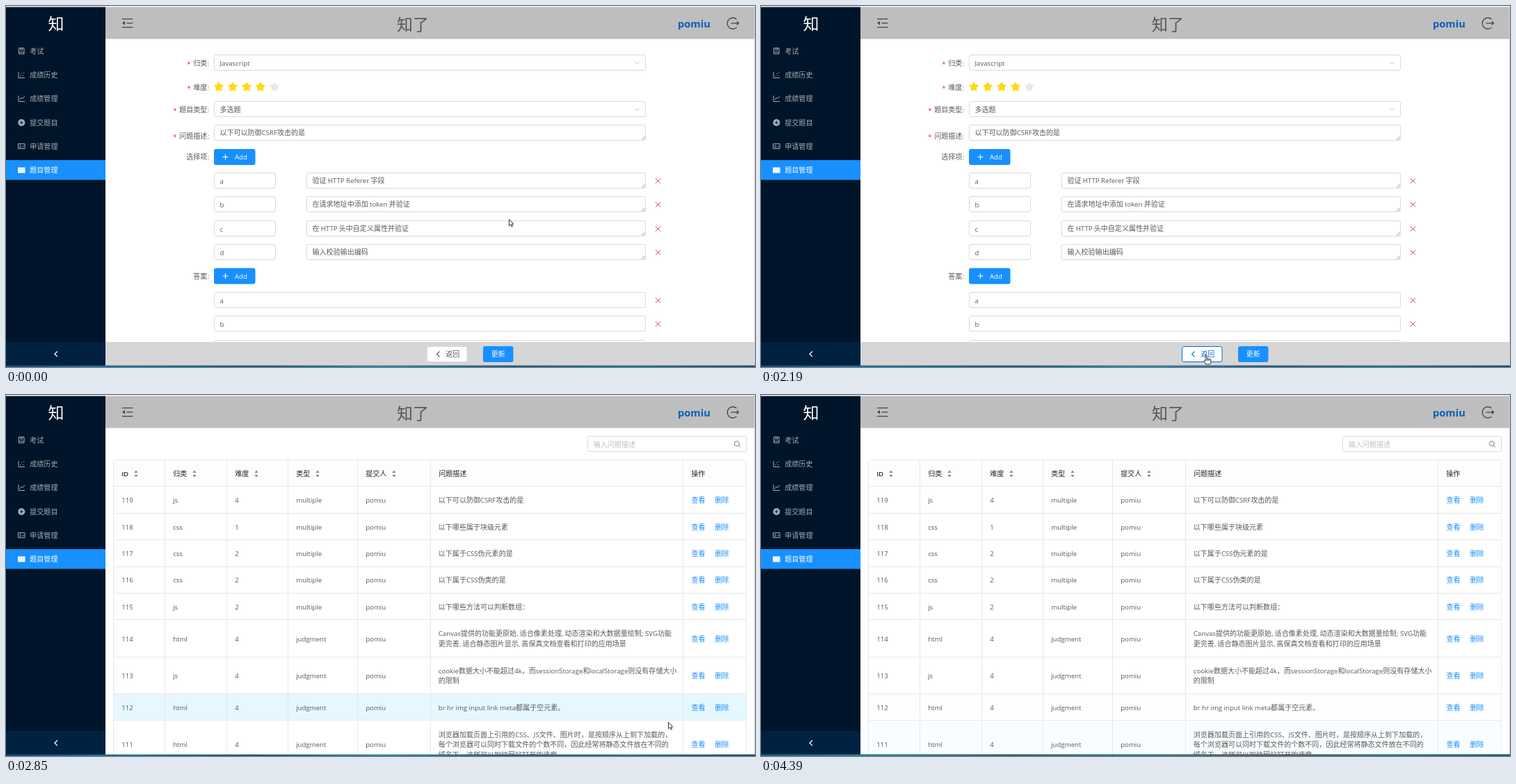
Write an HTML page that moves like this. It is 1077 by 520 pixels and loops after 4490 ms.

```html
<!DOCTYPE html>
<html lang="zh-CN">
<head>
<meta charset="utf-8">
<title>题目管理</title>
<style>
html, body { margin: 0; width: 100%; height: 100%; overflow: hidden; background: #fff; }
svg { display: block; width: 100vw; height: 100vh; }
text { font: 10.04px "Noto Sans CJK SC", "Noto Sans CJK", sans-serif; fill: #595959; }
.l { font-family: "Open Sans", "Noto Sans", sans-serif; font-size: .96em; }
.menu { fill: #a6adb4; }
.white { fill: #fff; }
.head { fill: #262626; }
.head .l { font-weight: 600; }
.link { fill: #1890ff; }
.hint { fill: #bfbfbf; }
.star { fill: #f5222d; }
.end { text-anchor: end; }
.mid { text-anchor: middle; }
.logo { font-size: 22.94px; fill: #fff; }
.title { font-size: 22.94px; fill: #555; }
.user { fill: #0a5fb8; font-size: 15.3px; font-weight: 700; }
.box { fill: #fff; stroke: #d9d9d9; }
.line { fill: none; stroke: #e8e8e8; }
.ico { fill: none; stroke: #a6adb4; }
.dark { fill: none; stroke: #444; stroke-width: 1.3; }

#form, #table, #cur, #cur > *, .box, .row, #back *, #strip2 {
  animation: 4.49s step-end infinite;
}
#form { animation-name: form; }
#table { opacity: 0; animation-name: table; }
@keyframes form { 0% { opacity: 1 } 51.44%, 100% { opacity: 0 } }
@keyframes table { 0% { opacity: 0 } 51.44%, 100% { opacity: 1 } }

#optC { animation-name: optC; }
#optD { animation-name: optD; }
#ansA { animation-name: ansA; }
#ansB { animation-name: ansB; }
@keyframes optC { 3.11% { stroke: #7fbdf0 } 6.01% { stroke: #d9d9d9 } }
@keyframes optD { 6.01% { stroke: #7fbdf0 } 9.35% { stroke: #40a9ff } 12.69% { stroke: #d9d9d9 } }
@keyframes ansA { 12.69% { stroke: #7fbdf0 } 15.36% { stroke: #d9d9d9 } }
@keyframes ansB { 15.36% { stroke: #7fbdf0 } 18.03% { stroke: #d9d9d9 } }

#back rect { animation-name: edge; }
#back path { animation-name: arrow; }
#back text { animation-name: label; }
@keyframes edge {
  0% { stroke: #d9d9d9 } 21.38% { stroke: #a9c8e4 } 24.05% { stroke: #66b5f8 }
  26.72% { stroke: #40a9ff } 48.77%, 100% { stroke: #096dd9 }
}
@keyframes arrow {
  0% { stroke: #595959 } 21.38% { stroke: #4f7da6 } 24.05% { stroke: #459be2 }
  26.72% { stroke: #40a9ff } 48.77%, 100% { stroke: #096dd9 }
}
@keyframes label {
  0% { fill: #595959 } 21.38% { fill: #4f7da6 } 24.05% { fill: #459be2 }
  26.72% { fill: #40a9ff } 48.77%, 100% { fill: #096dd9 }
}

.row { fill: #fff; }
#r112 { animation-name: r112; }
#r111 { animation-name: r111; }
@keyframes r112 {
  0% { fill: #fff } 60.13% { fill: #fbfeff } 63.47% { fill: #e6f7ff }
  66.14% { fill: #f0faff } 68.81%, 100% { fill: #fcfeff }
}
@keyframes r111 {
  0% { fill: #fff } 51.44% { fill: #f4fbff } 54.11% { fill: #e6f7ff } 60.13% { fill: #e9f8ff }
  63.47% { fill: #fff } 66.14% { fill: #e9f8ff } 68.81% { fill: #f0faff } 72.16%, 100% { fill: #fafdff }
}

#cur { animation-name: move; }
#tip { animation-name: tip; }
#beam { opacity: 0; animation-name: beam; }
#hand { opacity: 0; animation-name: hand; }
@keyframes move {
  0% { transform: translate(723px, 307px) }
  3.11% { transform: translate(721px, 320px) }
  6.01% { transform: translate(716px, 362px) }
  9.35% { transform: translate(705px, 396px) }
  12.69% { transform: translate(688px, 424px) }
  15.36% { transform: translate(664px, 458px) }
  18.03% { transform: translate(646px, 501px) }
  21.38% { transform: translate(632px, 507px) }
  30.06% { transform: translate(641px, 503px) }
  51.44% { transform: translate(643px, 502px) }
  57.46% { transform: translate(712px, 476px) }
  60.13% { transform: translate(784px, 451px) }
  63.47% { transform: translate(952px, 471px) }
  66.14%, 100% { transform: translate(998px, 503px) }
}
@keyframes tip {
  0% { opacity: 1 } 3.11% { opacity: 0 } 9.35% { opacity: 1 } 12.69% { opacity: 0 }
  18.03% { opacity: 1 } 21.38% { opacity: 0 } 57.46% { opacity: 1 } 68.81%, 100% { opacity: 0 }
}
@keyframes beam {
  0% { opacity: 0 } 3.11% { opacity: 1 } 9.35% { opacity: 0 } 12.69% { opacity: 1 }
  18.03% { opacity: 0 } 51.44% { opacity: 1 } 57.46%, 100% { opacity: 0 }
}
@keyframes hand { 0% { opacity: 0 } 21.38% { opacity: 1 } 51.44%, 100% { opacity: 0 } }

#strip2 { opacity: 0; animation-name: strip; }
@keyframes strip { 0% { opacity: 0 } 97.77%, 100% { opacity: 1 } }
</style>
</head>
<body>
<svg id="stage" viewBox="0 0 1077 520" preserveAspectRatio="none"></svg>
<script>
const USER = 'pomiu';
const EM = 10.04;

// Text is placed by its vertical centre; Latin runs get their own face.
const text = (x, y, s, cls = '', drop = 3.7) =>
  `<text x="${x}" y="${y + drop}" class="${cls}">` +
  String(s).replace(/[!-~]+( [!-~]+)*/g, m => `<tspan class="l">${m}</tspan>`) + '</text>';
const rect = (x, y, w, h, attrs) => `<rect x="${x}" y="${y}" width="${w}" height="${h}" ${attrs}/>`;
const path = (d, attrs) => `<path d="${d}" ${attrs}/>`;
const box = (x, y, w, id = '') => rect(x + .5, y + .5, w - 1, 22, `rx="2.5" class="box" ${id && `id="${id}"`}`);
const each = (list, fn) => list.map(fn).join('');

function sidebar() {
  const items = ['考试', '成绩历史', '成绩管理', '提交题目', '申请管理', '题目管理'];
  const icons = [
    path('M18.5 60.5h7.5v8.5h-7.5zM18.5 66.7h7.5M21 60.5v3.4l1.3-1 1.3 1v-3.4', 'class="ico"'),
    path('M18 95v8.5h9M20.5 100.5h1.2M22 97.5h1.2M24 100.5h1.2M25 96h1.2', 'class="ico"'),
    path('M18 129v8.5h9M19.8 135l2.2-3 2 1.6 2.8-3.8', 'class="ico"'),
    '<circle cx="22.3" cy="168" r="5" fill="#a6adb4"/>' + path('M19.8 168h5M22.3 165.5v5', 'stroke="#001529"'),
    path('M17.5 198.5h9.5v7h-9.5zM19 201h3M19 203.3h3M23.3 202.5l1 1 1.7-2.3', 'class="ico"'),
    rect(17, 232.5, 10.5, 8, 'fill="#fff"') + path('M17.5 235h9.5M17.5 238h9.5', 'stroke="#1890ff" stroke-opacity=".35" stroke-width=".7"')
  ];
  return rect(0, 1, 143, 517, 'fill="#001529"') +
    rect(0, 222, 143, 28.5, 'fill="#1890ff"') +
    rect(0, 484, 143, 34, 'fill="#002140"') +
    text(72, 25, '知', 'logo mid', 8.6) +
    icons.join('') +
    each(items, (s, i) => text(34.3, 65 + i * 34.3, s, i == 5 ? 'white' : 'menu')) +
    path('M74 497.5l-4 3.8 4 3.8', 'fill="none" stroke="#fff" stroke-width="1.3"');
}

function header() {
  return rect(143, 1, 934, 46.5, 'fill="#bebebe"') +
    path('M167 18.7h15.3M173.5 24.6h8.8M167 30.6h15.3', 'class="dark"') +
    path('M167 24.6l4-2.8v5.6z', 'fill="#444"') +
    text(585, 26, '知了', 'title mid', 8.6) +
    text(966, 25.5, USER, 'user', 5.3) +
    path('M1050.5 19a8 8 0 1 0 0 12M1042.5 24.8h10.5M1050.8 22.3l2.7 2.5-2.7 2.5', 'class="dark"');
}

function form() {
  const label = (y, s, must) => text(289.3, y, s, 'end') + text(289.8, y, ':') +
    (must ? text(289.3 - s.length * EM - 9, y + 1, '*', 'star') : '');
  const grip = y => path(`M918.5 ${y + 17}l-4.5 4.5M918.5 ${y + 20}l-1.5 1.5`, 'stroke="#777" stroke-width=".8"');
  const area = (x, y, s, id) => box(x, y, 920 - x, id) + grip(y) + text(x + 8.5, y + 11.5, s);
  const select = (y, s) => box(299, y, 621) + text(307.5, y + 12, s) +
    path(`M904.5 ${y + 10.5}l3 3.2 3-3.2`, 'fill="none" stroke="#bfbfbf"');
  const cross = y => path(`M934 ${y - 3.5}l7 7m0-7l-7 7`, 'stroke="#f5222d"');
  const add = y => rect(299, y, 59.5, 23, 'rx="3" fill="#1890ff"') +
    path(`M311.5 ${y + 11.5}h8m-4-4v8`, 'stroke="#fff" stroke-width="1.1"') + text(329, y + 11.7, 'Add', 'white');
  const star = (x, y) => Array.from({ length: 10 }, (_, i) => {
    const r = i % 2 ? 3.7 : 6.8, a = i * Math.PI / 5;
    return (x + r * Math.sin(a)).toFixed(2) + ',' + (y - r * Math.cos(a)).toFixed(2);
  }).join(' ');
  const options = [
    ['a', '验证 HTTP Referer 字段'], ['b', '在请求地址中添加 token 并验证'],
    ['c', '在 HTTP 头中自定义属性并验证'], ['d', '输入校验输出编码']
  ];
  return '<g id="form">' +
    label(82, '归类', 1) + select(70, 'Javascript') +
    label(117, '难度', 1) + each([0, 1, 2, 3, 4], i => {
      const fill = i < 4 ? '#fadb14' : '#e8e8e8';
      return `<polygon points="${star(306 + i * 20, 116.6)}" fill="${fill}" stroke="${fill}" stroke-linejoin="round"/>`;
    }) +
    label(149, '题目类型', 1) + select(137, '多选题') +
    label(187.5, '问题描述', 1) + area(299, 171, '以下可以防御CSRF攻击的是') +
    label(217, '选择项') + add(206) +
    each(options, ([k, s], i) => {
      const y = 240 + Math.round(i * 34.4);
      return box(299, y, 89) + text(307.5, y + 12.5, k) + area(432, y, s, 'opt' + k.toUpperCase()) + cross(y + 12);
    }) +
    label(389, '答案') + add(377.5) +
    each(['a', 'b', 'c'], (k, i) => {
      const y = 412 + Math.round(i * 34.3);
      return box(299, y, 621, 'ans' + k.toUpperCase()) + text(307.5, y + 12.5, k) + cross(y + 12);
    }) +
    rect(143, 484, 934, 34, 'fill="#d6d6d6"') +
    '<g id="back">' + rect(605.5, 490.5, 57.5, 22, 'rx="2.5" fill="#fff" stroke="#d9d9d9"') +
    path('M623.5 497.5l-4 4 4 4', 'fill="none" stroke="#595959" stroke-width="1.1"') +
    text(632.3, 501.5, '返回') + '</g>' +
    rect(686, 490, 43.5, 23, 'rx="3" fill="#1890ff"') + text(697.8, 501.5, '更新', 'white') +
    '</g>';
}

function table() {
  const cols = [154.5, 228.5, 317.5, 405.5, 505.5, 610.5, 973.5, 1064.5];
  const heads = ['ID', '归类', '难度', '类型', '提交人', '问题描述', '操作'];
  const sorters = [187, 271, 360, 448, 558];
  const rows = [
    ['js', 4, 'multiple', '以下可以防御CSRF攻击的是'],
    ['css', 1, 'multiple', '以下哪些属于块级元素'],
    ['css', 2, 'multiple', '以下属于CSS伪元素的是'],
    ['css', 2, 'multiple', '以下属于CSS伪类的是'],
    ['js', 2, 'multiple', '以下哪些方法可以判断数组：'],
    ['html', 4, 'judgment', 'Canvas提供的功能更原始, 适合像素处理, 动态渲染和大数据量绘制; SVG功能', '更完善, 适合静态图片显示, 高保真文档查看和打印的应用场景'],
    ['js', 4, 'judgment', 'cookie数据大小不能超过4k，而sessionStorage和localStorage则没有存储大小', '的限制'],
    ['html', 4, 'judgment', 'br hr img input link meta都属于空元素。'],
    ['html', 4, 'judgment', '浏览器加载页面上引用的CSS、JS文件、图片时，是按顺序从上到下加载的，', '每个浏览器可以同时下载文件的个数不同，因此经常将静态文件放在不同的', '域名下，这样可以加快网站打开的速度']
  ];
  let top = 131.8;
  const body = each(rows, ([cat, level, type, ...lines], i) => {
    const h = 23.4 + lines.length * 15, mid = top + h / 2 + .4, id = 119 - i;
    const y = Math.floor(top) + .5;
    top += h;
    return rect(155, y, 909, h, `class="row" id="r${id}"`) +
      path(`M155 ${y}H1064`, 'class="line"') +
      each([id, cat, level, type, USER], (s, c) => text(cols[c] + 11.7, mid, s)) +
      each(lines, (s, n) => text(621.8, mid + (n - (lines.length - 1) / 2) * 14.8, s)) +
      text(985.5, mid, '查看', 'link') + text(1019.5, mid, '删除', 'link');
  });
  return '<g id="table">' + rect(143, 47.5, 934, 471, 'fill="#fff"') +
    box(836, 59, 229) + text(844.8, 71, '输入问题描述', 'hint') +
    '<circle cx="1050.8" cy="70" r="3.5" fill="none" stroke="#777"/>' + path('M1053.3 72.5l2.7 2.8', 'stroke="#777"') +
    rect(155, 94, 909, 38, 'fill="#fdfdfd"') +
    each(heads, (s, i) => text(cols[i] + 11.7, 113, s, 'head')) +
    each(sorters, x => path(`M${x - 2.7} 112l2.7-3.5 2.7 3.5zM${x - 2.7} 115l2.7 3.5 2.7-3.5z`, 'fill="#8c8c8c"')) +
    body +
    path('M154.5 520V96.5q0-3 3-3H1061.5q3 0 3 3V520', 'class="line"') +
    each(cols.slice(1, -1), x => path(`M${x} 94V520`, 'class="line"')) +
    '</g>';
}

function strip(id, colors) {
  const stops = each(colors, (c, i) => `<stop offset="${i / (colors.length - 1)}" stop-color="${c}"/>`);
  return `<linearGradient id="${id}Fill">${stops}</linearGradient>` +
    rect(0, 517.7, 1077, 2.3, `id="${id}" fill="url(#${id}Fill)"`);
}

function cursor() {
  return '<g id="cur">' +
    path('M.5.5v9.2l2.1-2 1.5 3.3 1.5-.7-1.5-3.2h2.8z', 'id="tip" fill="#fff" stroke="#222" stroke-width=".9"') +
    path('M-2.5-6.5h2l.5.5.5-.5h2M0-6v12M-2.5 6.5h2l.5-.5.5.5h2', 'id="beam" fill="none" stroke="#222" stroke-width=".9"') +
    path('M-1.8 8.5V1q0-1 1-1t1 1v4q1.5-.7 2 .3 1.5-.5 1.9.5 1.7-.3 1.7 1.2v3q0 1.5-1.2 3H-1.3q-.7-1.5-2.5-3.8-.8-1.5.5-1.7.8 0 1.5 1zM.2 5v3M2.2 5.5v2.5M4.1 6v2',
      'id="hand" fill="#fff" stroke="#222" stroke-width=".9" stroke-linejoin="round"') +
    '</g>';
}

document.getElementById('stage').innerHTML =
  rect(0, 0, 1077, 520, 'fill="#fff"') + form() + table() + header() + sidebar() +
  rect(0, 0, 1077, 1.5, 'fill="#f6f6f6"') +
  rect(1076, 1, 1, 517, 'fill="#d4d4d4"') +
  strip('strip1', ['#174a70', '#2474a3', '#1b5a84', '#2f86b0', '#1d5d86', '#27739c', '#174f78']) +
  strip('strip2', ['#1d5f80', '#2b8296', '#39606a', '#2b7d8e', '#5a5b58', '#2a7488', '#1b5a78']) +
  cursor();
</script>
</body>
</html>
```
